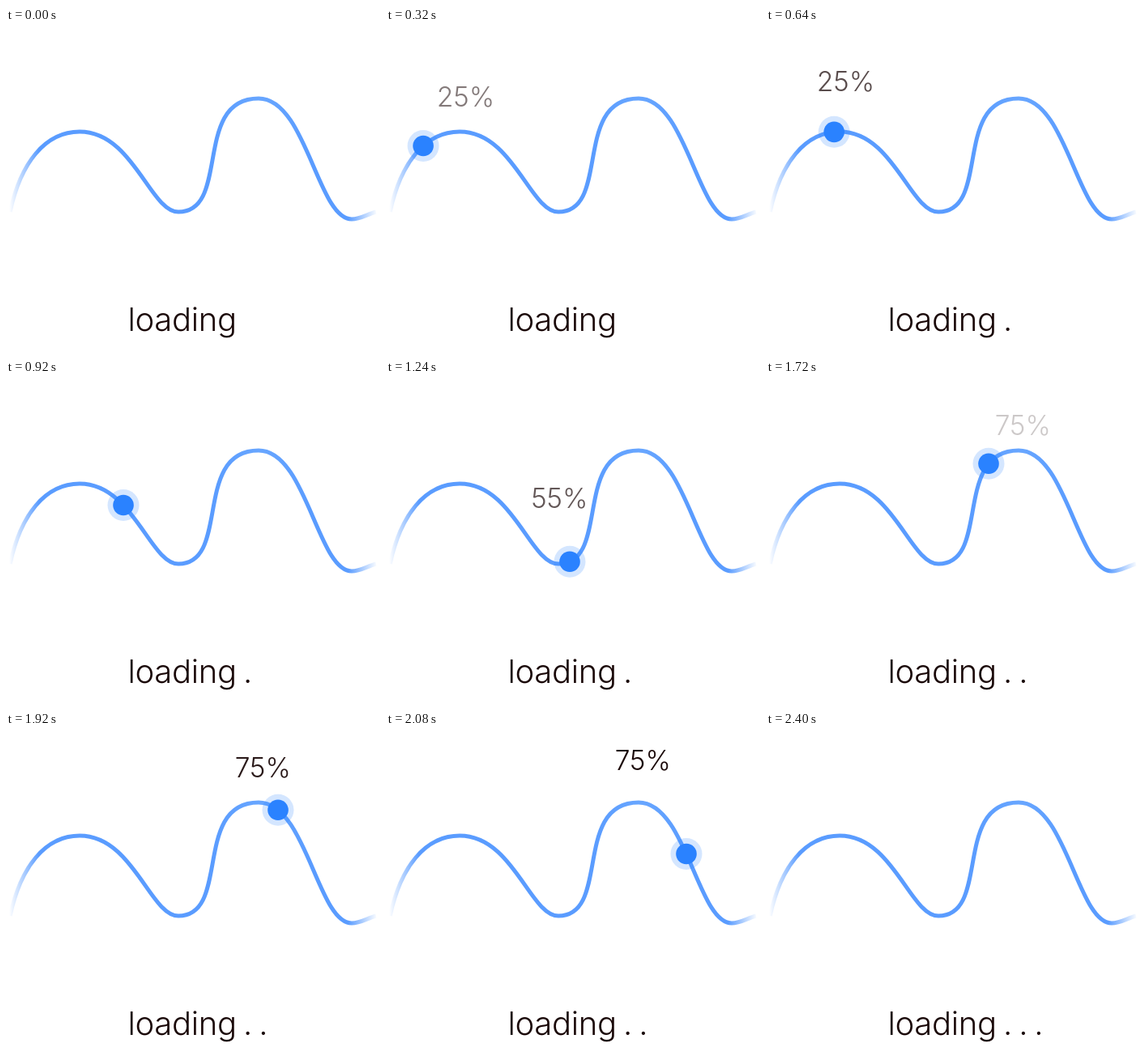
An HTML page that plays this animation: 462 px wide and 400 px high, repeating every 2.96 s.

```html
<!DOCTYPE html>
<html lang="en">
<head>
<meta charset="utf-8">
<style>
  html, body { margin: 0; width: 100%; height: 100%; overflow: hidden; background: #fff; }
  svg { display: block; width: 462px; height: 400px; }
  text { font-family: Inter, "Open Sans", sans-serif; font-weight: 300; fill: #1a0808; white-space: pre; }
  #caption { font-size: 40px; letter-spacing: -.3px; word-spacing: -2.8px; }
  #labels { font-size: 33.5px; }
</style>
</head>
<body>
<svg viewBox="0 0 462 400">
  <defs>
    <linearGradient id="fade" gradientUnits="userSpaceOnUse" x1="4" x2="459" y1="0" y2="0">
      <stop offset="0" stop-color="#5a9cff" stop-opacity="0"/>
      <stop offset=".08" stop-color="#5a9cff"/>
      <stop offset=".55" stop-color="#5a9cff"/>
      <stop offset=".68" stop-color="#68a6ff"/>
      <stop offset=".82" stop-color="#5a9cff"/>
      <stop offset=".92" stop-color="#5a9cff"/>
      <stop offset="1" stop-color="#5a9cff" stop-opacity="0"/>
    </linearGradient>
  </defs>
  <path id="wave" fill="none" stroke="url(#fade)" stroke-width="5"
    d="M5 227C18 167 48 128 91 128C157 128 178 227 213 227C278 227 230 87 312 87C371 87 385 236 427 236C438 236 446 230 457 227"/>
  <g id="ball" fill="#2a82ff">
    <circle r="19.5" opacity=".2"/>
    <circle r="12.8"/>
  </g>
  <g id="labels"></g>
  <text id="caption" x="150.5" y="374"></text>
</svg>
<script>
const LOOP = 2960, STEP = 40, END = 2400;
const $ = id => document.getElementById(id);
const wave = $('wave'), ball = $('ball'), caption = $('caption');
const clamp = v => Math.max(0, Math.min(1, v));

// Distance along the wave at which it reaches x.
function lengthAt(x) {
  let lo = 0, hi = wave.getTotalLength();
  for (let i = 0; i < 24; i++) {
    const mid = (lo + hi) / 2;
    if (wave.getPointAtLength(mid).x < x) lo = mid; else hi = mid;
  }
  return lo;
}

const keys = [
  [40, 14], [320, 46], [560, 70.5], [920, 145], [1120, 189.5], [1240, 227],
  [1680, 269.5], [1720, 275], [2080, 371], [2240, 398.5], [2360, 439], [2400, 451]
].map(([t, x]) => ({ t, s: lengthAt(x) }));

const slope = i => (keys[i + 1].s - keys[i].s) / (keys[i + 1].t - keys[i].t);
keys.forEach((k, i) => {
  if (i === 0) k.v = slope(0);
  else if (i === keys.length - 1) k.v = slope(i - 1);
  else {
    const before = k.t - keys[i - 1].t, after = keys[i + 1].t - k.t;
    k.v = (slope(i - 1) * after + slope(i) * before) / (before + after);
  }
});

// Smooth cubic travel between the keys.
function travel(t) {
  let i = 0;
  while (i < keys.length - 2 && t > keys[i + 1].t) i++;
  const a = keys[i], b = keys[i + 1], h = b.t - a.t, u = clamp((t - a.t) / h), w = 1 - u;
  return w * w * ((1 + 2 * u) * a.s + u * h * a.v) + u * u * ((1 + 2 * w) * b.s - w * h * b.v);
}

const labels = [
  { text: '25%', x: 62.7, y: 105.7, start: 170 },
  { text: '55%', x: 179.2, y: 169, start: 1050 },
  { text: '75%', x: 282.7, y: 71.5, start: 1660 }
];
for (const label of labels) {
  label.node = document.createElementNS('http://www.w3.org/2000/svg', 'text');
  label.node.textContent = label.text;
  label.node.setAttribute('x', label.x);
  $('labels').append(label.node);
}

const dotTimes = [480, 1320, 2160];

function draw(t) {
  const scale = t >= END ? 0 : clamp(Math.min(t / 200, (2440 - t) / 200));
  const p = wave.getPointAtLength(travel(t));
  ball.setAttribute('transform', `translate(${p.x} ${p.y}) scale(${scale})`);
  for (const { node, y, start } of labels) {
    const age = t - start;
    node.setAttribute('y', y - age * 0.0583);
    node.setAttribute('opacity', clamp(Math.min(age / 280, (600 - age) / 180)));
  }
  caption.textContent = 'loading' + ' .'.repeat(dotTimes.filter(d => t >= d).length);
}

let origin;
function tick(now) {
  origin ??= now;
  const t = (now - origin) % LOOP;
  draw(Math.min(END, Math.floor(t / STEP) * STEP));
  requestAnimationFrame(tick);
}
draw(0);
requestAnimationFrame(tick);
</script>
</body>
</html>
```
